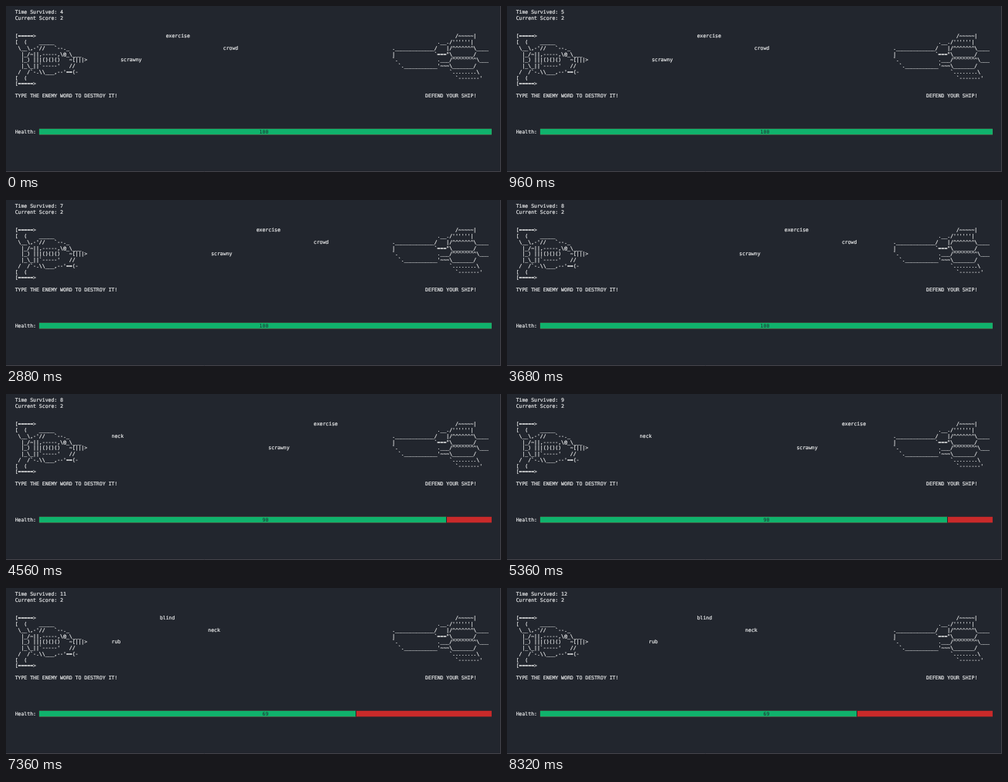
An HTML page that plays this animation: 640 by 216 pixels, repeating every 8400 ms.

```html
<!DOCTYPE html>
<html lang="en">
<head>
<meta charset="utf-8">
<title>Typing defence</title>
<style>
  html, body { margin: 0; width: 100%; height: 100%; overflow: hidden; background: #22262e; }
  svg { display: block; width: 640px; height: 216px; }
  text {
    font: 6.478px "DejaVu Sans Mono", "Liberation Mono", monospace;
    fill: #e6e7e8;
    stroke: #e6e7e8;
    stroke-width: 0.2px;
    white-space: pre;
    text-rendering: geometricPrecision;
  }
  text.dark { fill: #22262e; stroke: none; }
</style>
</head>
<body>
<svg id="stage" viewBox="0 0 640 216">
  <path d="M639.5 0V215.5H0" fill="none" stroke="#45434a"/>
</svg>

<script type="text/plain" id="enemy">
[=====>
[  (    _____
 \__\,-'//   `--._
  |_/~||,-----,\@_\___
  |_) |||()()()   ~[|||>
  |_\_||`-----'   //
 /  /`-.\\___,--'==(-
[  (
[=====>
</script>
<script type="text/plain" id="ship">
                     /~~~~~|
               .__./''''''|
._____________/   |/^^^^^^^\____
|             `==="\_______/
`.             .___/^^^^^^^^\___
  `.___________'~~~\_______/
                   `........\
                     `-------'
</script>

<script>
const LOOP = 8400, TICK = 80;
const CELL_W = 3.9, CELL_H = 7.79, LEFT = 11.7, BASE = 10;
const BAR_COL = 8, BAR_COLS = 150, BAR_Y = 159.8, BAR_H = 7.6;
const SPAWN = 32, HIT = 123;

const stage = document.getElementById("stage");
const colX = col => LEFT + col * CELL_W;

function add(tag, attrs) {
  const el = document.createElementNS("http://www.w3.org/2000/svg", tag);
  for (const key in attrs) el.setAttribute(key, attrs[key]);
  return stage.appendChild(el);
}

function print(col, row, str = "", cls = "") {
  const el = add("text", { x: colX(col), y: BASE + row * CELL_H, class: cls });
  el.textContent = str;
  return el;
}

function printArt(id, col, row) {
  const lines = document.getElementById(id).textContent.replace(/^\n|\n$/g, "").split("\n");
  lines.forEach((line, i) => print(col, row + i, line));
}

function bar(fill, width = BAR_COLS * CELL_W) {
  return add("rect", { x: colX(BAR_COL), y: BAR_Y, width, height: BAR_H, fill });
}

const clock = print(0, 0);
print(0, 1, "Current Score: 2");
printArt("enemy", 0, 4);
printArt("ship", 125, 4);
print(0, 14, "TYPE THE ENEMY WORD TO DESTROY IT!");
print(136, 14, "DEFEND YOUR SHIP!");
print(0, 20, "Health:");
bar("#c92a2a");
const health = bar("#10b26c");
const seam = bar("#22262e", 1);
const percent = print(81, 20, "", "dark");

// Each lane holds a word, then its successor once the first reaches the ship.
const lanes = [
  { row: 4, col: 50, first: "exercise", next: "blind" },
  { row: 6, col: 69, first: "crowd", next: "neck" },
  { row: 8, col: 35, first: "scrawny", next: "rub" }
].map(lane => ({
  ...lane,
  hitStep: HIT - lane.col - lane.first.length,
  el: print(lane.col, lane.row)
}));

// Ticks on which the words wait, and ticks on which a second is counted.
const stalls = [1, 8, 13, 20, 26, 33, 43, 52, 62, 74, 87];
const seconds = [8, 20, 33, 45, 58, 70, 83, 95];
const passed = (list, tick) => list.filter(t => t <= tick).length;
const labels = ["100", "90", "79", "69"];

function draw(time) {
  const tick = Math.floor((time % LOOP) / TICK);
  const step = tick - passed(stalls, tick);
  let hits = 0;

  clock.textContent = "Time Survived: " + (4 + passed(seconds, tick));
  for (const { el, col, first, next, hitStep } of lanes) {
    const hit = step >= hitStep;
    if (hit) hits++;
    el.textContent = hit ? next : first;
    el.setAttribute("x", colX(hit ? SPAWN + step - hitStep : col + step));
  }

  const filled = BAR_COLS * (1 - hits / 10);
  health.setAttribute("width", filled * CELL_W);
  seam.setAttribute("x", Math.round(colX(BAR_COL + filled)));
  percent.textContent = labels[hits];
  percent.setAttribute("x", colX(hits ? 82 : 81));
}

function loop() {
  draw(performance.now());
  requestAnimationFrame(loop);
}
loop();
</script>
</body>
</html>
```
